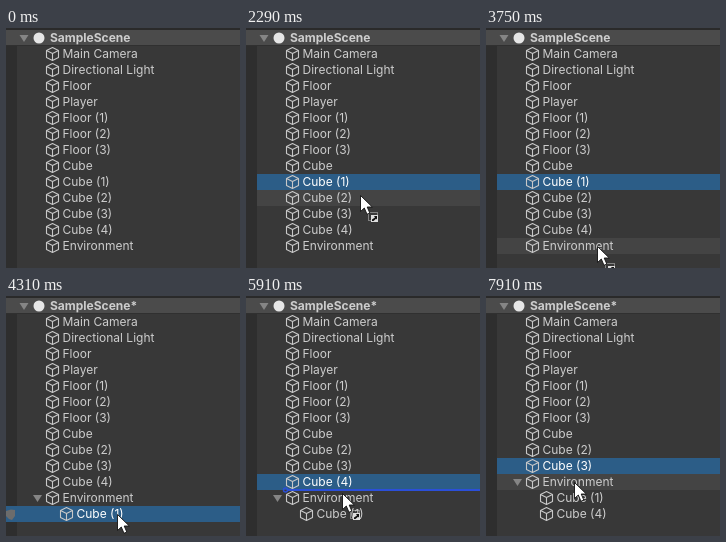
Animation of 234x240 px, one loop 8 s. Source, as an HTML page:

```html
<!DOCTYPE html>
<html lang="en">
<head>
<meta charset="utf-8">
<title>Hierarchy drag and drop</title>
<style>
html, body { margin: 0; width: 100%; height: 100%; overflow: hidden; background: #383838; }
svg { display: block; width: 234px; height: 240px; }
text { font: 12px Inter, Roboto, sans-serif; fill: #cdcdcd; white-space: pre; }
.title { font-weight: 700; }
.selected { fill: #fff; }
.icon { fill: none; stroke: #c8c8c8; stroke-width: 1.1; stroke-linejoin: round; }
</style>
</head>
<body>
<svg id="stage" viewBox="0 0 234 240"></svg>
<script>
const LOOP = 8000, ROW = 16, TOP = 18, GUTTER = 11, WIDTH = 234;
const ENTRY = { x: 180, y: 140 };
const stage = document.getElementById('stage');

// Each gesture reaches for a cube, presses it, carries it to Environment and drops it.
const gestures = [
  { cube: 'Cube (1)', x: 115, reach: [1000, 1800], press: 1900, carry: [2140, 3840], drop: 4310 },
  { cube: 'Cube (4)', x: 98, reach: [4920, 5350], press: 5590, carry: [5800, 6090], drop: DROP(6340) },
  { cube: 'Cube (3)', x: 92, reach: [6800, 7240], press: 7440, carry: [7510, 7910], drop: LOOP }
];
function DROP(t) { return t; }

const numbered = (name, count) => Array.from({ length: count }, (_, i) => `${name} (${i + 1})`);
const names = ['Main Camera', 'Directional Light', 'Floor', 'Player', ...numbered('Floor', 3),
  'Cube', ...numbered('Cube', 4), 'Environment'];

function rowsAt(t) {
  const moved = gestures.filter(g => t >= g.drop).map(g => g.cube);
  return [...names.filter(name => !moved.includes(name)), ...moved];
}
const rowMid = (name, t) => TOP + ROW * (rowsAt(t).indexOf(name) + .5);

// Decelerating move; long sideways moves sag a little.
function glide(from, to, [start, end], t, power) {
  const k = Math.min(1, Math.max(0, (t - start) / (end - start)));
  const eased = 1 - (1 - k) ** power;
  const sag = .17 * Math.abs(to.x - from.x) * Math.sin(Math.PI * k);
  return { x: from.x + (to.x - from.x) * eased, y: from.y + (to.y - from.y) * eased + sag };
}

function pointerAt(t) {
  let p = ENTRY;
  for (const { cube, x, reach, press, carry } of gestures) {
    p = glide(p, { x, y: t < reach[0] ? p.y : rowMid(cube, press) + 2 }, t < reach[0] ? [t, t + 1] : reach, t, 3);
    if (t < reach[0]) return null;
    if (t < carry[0]) return p;
    p = glide(p, { x: x - 4, y: rowMid('Environment', press) }, carry, t, 2);
    if (t < nextReach(reach)) return p;
  }
  return p;
}
function nextReach(reach) {
  const next = gestures.find(g => g.reach[0] > reach[0]);
  return next ? next.reach[0] : Infinity;
}

const rect = (x, y, w, h, fill) =>
  `<rect x="${x}" y="${y}" width="${w}" height="${h}" fill="${fill}"/>`;
const path = (x, y, d, attrs) => `<path transform="translate(${x} ${y})" d="${d}" ${attrs}/>`;
const label = (x, y, text, kind) => `<text x="${x}" y="${y}" class="${kind}">${text}</text>`;
const foldout = (x, y) => path(x, y, 'M-4.5-3H4.5L0 4Z', 'fill="#858585"');
const cube = (x, y) =>
  path(x, y, 'M0-6.5L6-3.5V3.5L0 6.5-6 3.5V-3.5ZM-6-3.5L0-.5 6-3.5M0-.5V6.5', 'class="icon"');
const hand = y => path(0, y, 'M0-3L5-4.5 9-4V2L6 6 3 5 0 2Z', 'fill="#6c6c6c"');
const dropLine = y => rect(42, y - 1, WIDTH - 42, 2, '#2b4fd8') +
  `<circle cx="39.5" cy="${y}" r="2" fill="none" stroke="#2b4fd8" stroke-width="1.5"/>`;

function cursor(x, y, dragging) {
  const arrow = path(x, y, 'M.5.5V16.5L4.3 13 7 19.3 9.8 18 7.2 12H12.3Z',
    'fill="#fff" stroke="#111" stroke-width=".9"');
  if (!dragging) return arrow;
  return path(x + 8.5, y + 17.5, 'M0 0H9V8H0Z',
      'fill="none" stroke="#ccc" stroke-dasharray="1 1"') +
    rect(x + 11, y + 20, 7, 7, '#ddd') +
    path(x + 11, y + 20, 'M1 6V4.5L4 2.5 3 1H6V4.5L5 3.7 2.5 6Z', 'fill="#111"') + arrow;
}

function draw(t) {
  const pointer = pointerAt(t);
  const x = pointer && Math.round(pointer.x), y = pointer && Math.round(pointer.y);
  const gesture = gestures.filter(g => t >= g.press).pop();
  const pressed = gesture && t < gesture.drop;
  const dragging = pressed && t >= gesture.press + 80 && t < gesture.drop - 100;
  const edge = TOP + Math.round((y - TOP) / ROW) * ROW;
  const inserting = dragging && Math.abs(y - edge) <= 3;
  const hovered = pointer && !inserting ? Math.floor((y - TOP) / ROW) : -1;

  let out = rect(0, 0, WIDTH, 240, '#383838') + rect(0, 0, GUTTER, 240, '#2e2e2e') +
    rect(0, 0, WIDTH, 2, '#2a2a2a') + rect(0, 2, WIDTH, 15, '#4b4b4b') +
    rect(0, 17, WIDTH, 1, '#303030') +
    foldout(18, 10) + '<circle cx="33" cy="10" r="5.5" fill="#e6e6e6"/>' +
    label(44, 14, 'SampleScene' + (t >= gestures[0].drop ? '*' : ''), 'title');

  const rows = rowsAt(t), parent = rows.indexOf('Environment');
  rows.forEach((name, i) => {
    const top = TOP + i * ROW, mid = top + ROW / 2, indent = i > parent ? 14 : 0;
    const isSelected = gesture && name === gesture.cube, isHovered = i === hovered;
    const left = isHovered && !pressed ? 0 : GUTTER;
    if (isSelected || isHovered)
      out += rect(left, top, WIDTH - left, ROW, isSelected ? '#2c5d87' : '#444');
    if (isHovered && !pressed) out += hand(mid);
    if (i === parent && rows.length > i + 1) out += foldout(31.5, mid);
    out += cube(46.5 + indent, mid) + label(56.5 + indent, mid + 4, name, isSelected ? 'selected' : '');
  });

  if (inserting) out += dropLine(edge);
  if (pointer) out += cursor(x, y, dragging);
  return out;
}

let shown = '';
function frame(now) {
  const next = draw(now % LOOP);
  if (next !== shown) stage.innerHTML = shown = next;
  requestAnimationFrame(frame);
}
requestAnimationFrame(frame);
</script>
</body>
</html>
```
